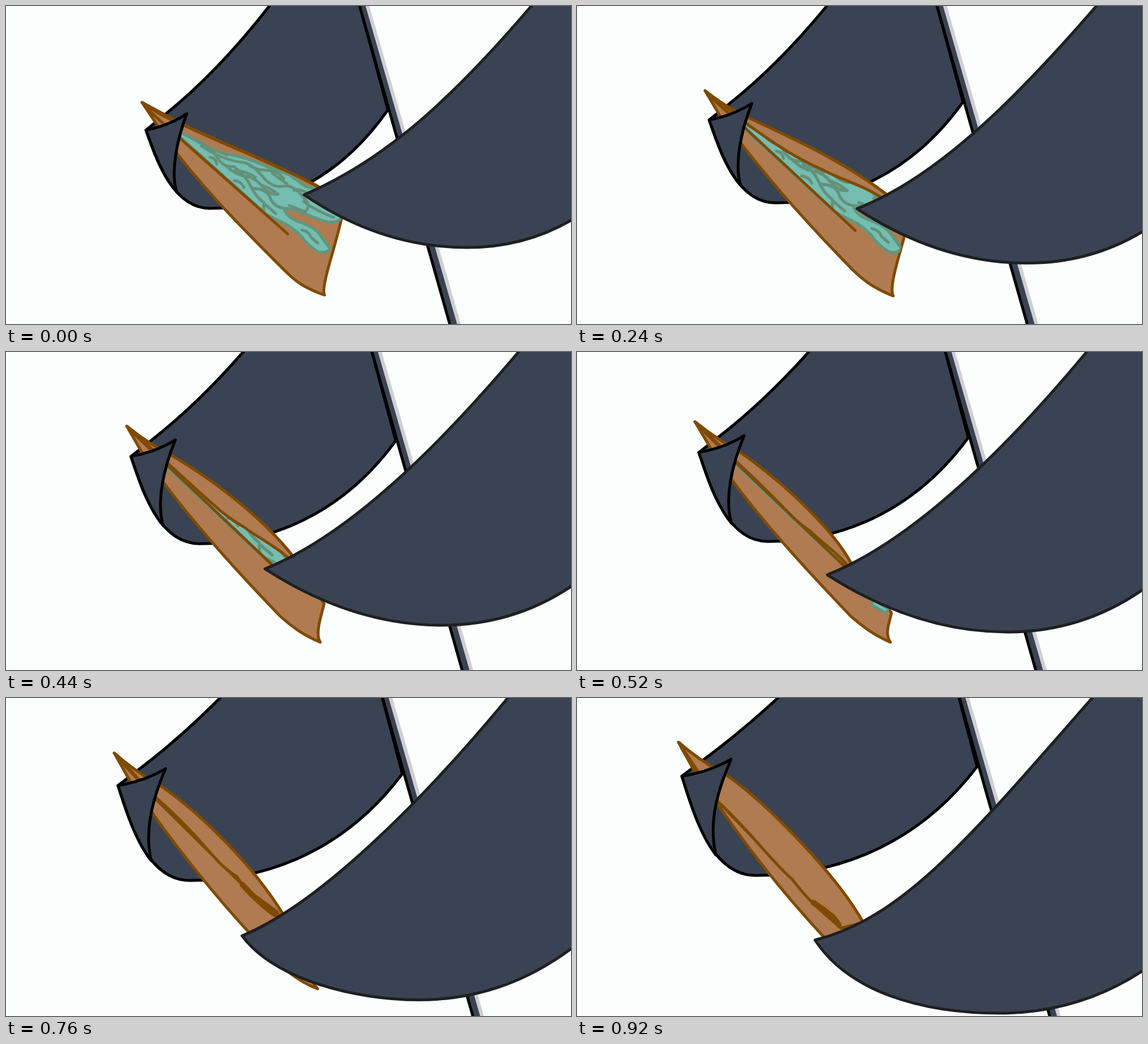
Animation, 997 px wide and 561 px high, one loop 0.96 s. Source, as an HTML page:

```html
<!DOCTYPE html>
<html lang="en">
<head>
<meta charset="utf-8">
<title>Rolling</title>
<style>
html, body { margin: 0; height: 100%; overflow: hidden; background: #fafffd; }
svg { display: block; width: 100%; height: 100%; }
path { stroke-width: 5; stroke-linejoin: round; stroke-linecap: round; fill: none; }
.skin { fill: #3a4353; stroke: #000; }
.front { stroke: #1f1f21; }
.rod { fill: #3a4353; }
.rim { stroke: #cfcfd2; stroke-width: 7; }
.line { stroke: #000; }
.paper { fill: #b07b50; stroke: #7f4a00; }
.crease { stroke: #7f4a00; }
.seam { stroke-width: 10; }
.herb { fill: #74bdb0; stroke: #5f9780; }
.strand { stroke: #64917a; }
</style>
</head>
<body>
<svg viewBox="0 0 997 561" preserveAspectRatio="none">
  <clipPath id="paperClip"><path id="clip"/></clipPath>
  <path id="body" class="skin"/>
  <g id="stick">
    <path class="rim" d="M631.5 -21L805 582"/>
    <path class="rod" d="M618 -21L628.5 -21L802 582L789 582Z"/>
    <path class="line" d="M618 -21L789 582"/>
  </g>
  <path id="paper" class="paper"/>
  <g clip-path="url(#paperClip)">
    <g id="filling">
      <path class="herb" d="M306 222L345 243Q375 260 395 262Q425 268 450 279Q478 290 500 298L528 318L552 324L592 374Q580 386 560 379Q530 368 505 358L490 357Q495 372 515 380Q545 390 555 405L572 428Q565 438 550 433Q530 420 522 407Q505 390 490 383L460 368L306 230Z"/>
      <path class="strand" d="M330 234Q360 246 372 266T402 283Q424 300 432 318T455 347V362M380 259L390 263M360 267Q370 268 372 279M345 247Q368 262 385 268T418 276T452 300T490 318T532 347Q536 354 528 363L500 352M405 290Q425 292 440 302M403 308Q415 309 420 320M430 282Q445 290 462 290T490 305M470 295L496 314M388 282Q405 298 422 300T452 318T480 332M436 322Q460 322 466 338T490 357M450 316Q465 320 478 331M458 351L476 366M508 325Q520 320 545 338M525 345Q545 360 578 373M522 395Q535 398 538 408L550 418"/>
    </g>
  </g>
  <path id="crumb" class="herb" d="M522 436L548 452Q550 462 540 458L520 446Z"/>
  <path id="crease" class="crease"/>
  <path id="flap" class="paper"/>
  <path id="seam" class="crease seam"/>
  <path id="thumb" class="skin"/>
  <path id="front" class="skin front"/>
</svg>
<script>
const LOOP = 960, STEP = 40, LAST = LOOP - STEP;
const el = id => document.getElementById(id);

// Path poses keyed by time in ms; poses of one shape share their commands.
const shapes = {
  body: {
    0: 'M480 -20Q382 110 280 192L247 219C265 270 294 357 360 357C480 357 591 302 674 183L619 -20Z',
    920: 'M378 -22Q300 52 227 106L185 138C205 200 235 313 315 313C440 313 591 272 706 121L669 -20Z'
  },
  thumb: {
    0: 'M247 219Q290 210 319 190C300 240 290 300 302 329C275 299 259 252 247 219Z',
    920: 'M185 138Q235 130 272 108C247 165 232 220 245 277C215 238 198 178 185 138Z'
  },
  paper: {
    0: 'M240 170Q275 195 320 213C420 258 520 298 580 335L592 375C580 430 555 495 562 510C525 497 510 485 490 465C430 405 360 335 304 263L268 212Z',
    160: 'M231 156Q265 182 305 203C390 240 480 275 553 325L584 394C575 430 551 495 559 511C525 497 508 485 488 465C420 395 350 320 296 250L258 198Z',
    320: 'M221 143Q255 172 297 190C400 240 460 275 540 340L571 420C566 440 548 497 557 512C525 500 505 485 485 466C410 390 345 315 287 240L245 187Z',
    520: 'M208 123Q245 153 288 177C350 220 448 305 485 375L555 460C552 475 542 497 553 512C525 500 505 485 483 466C420 400 340 315 275 228L236 170Z',
    680: 'M197 106Q236 139 280 163C335 203 430 290 488 380L541 486C540 495 538 500 550 513C520 502 500 485 480 468C415 400 340 315 264 211L225 155Z',
    840: 'M185 88Q224 124 270 150C330 190 425 275 490 383L541 486C540 495 538 500 550 513C520 502 500 485 480 468C412 400 330 305 254 197L212 137Z',
    920: 'M179 78Q218 112 265 137C340 190 460 315 505 396L541 486C540 495 538 500 550 513C520 502 500 485 480 468C408 395 325 300 248 187L207 129Z'
  },
  flap: {
    0: 'M240 170Q275 195 320 213C420 258 520 298 580 335L578 334C520 300 480 285 430 262C390 245 350 228 320 213Z',
    160: 'M231 156Q265 182 305 203C390 240 480 275 553 325L545 331C500 303 470 297 430 277C390 260 350 238 300 208Z',
    320: 'M221 143Q255 172 297 190C400 240 460 275 540 340L532 346C500 325 470 320 435 300C390 280 360 258 296 205Z',
    520: 'M208 123Q245 153 288 177C350 220 448 305 485 375L478 377C455 350 430 335 412 316C375 292 370 275 283 195Z',
    680: 'M197 106Q236 139 280 163C335 203 430 290 488 380L476 380C450 365 430 340 410 315C370 290 360 260 272 182Z',
    840: 'M185 88Q224 124 270 150C330 190 425 275 490 383L472 388C440 365 420 345 405 315C360 290 350 250 260 172Z',
    920: 'M179 78Q218 112 265 137C340 190 460 315 505 396L466 406C430 375 410 360 380 320C340 285 310 240 250 184Z'
  },
  crease: {
    0: 'M246 178Q285 215 310 236L497 402',
    320: 'M226 149Q262 182 293 209L489 394',
    680: 'M202 113Q240 152 268 182L472 378',
    840: 'M190 96Q230 140 258 172L468 386',
    920: 'M184 88Q220 145 250 184L464 405'
  },
  seam: {
    600: 'M408 312L425 337L448 356L480 378',
    840: 'M422 338L440 354L458 366L476 380',
    920: 'M417 361L436 374L452 387L462 400'
  },
  front: {
    0: pose(526, 333, 650, 280, 765, 190, 927, 378, 813, 426, 713, 617, 395),
    160: pose(508, 348, 640, 300, 765, 180, 921, 393, 803, 443, 701, 603, 411),
    320: pose(480, 367, 620, 310, 765, 170, 912, 404, 785, 464, 682, 580, 432),
    680: pose(411, 414, 580, 347, 760, 160, 889, 433, 738, 518, 630, 520, 483),
    840: pose(422, 425, 520, 383, 700, 215, 882, 452, 720, 547, 600, 428, 510),
    920: pose(420, 427, 575, 388, 690, 250, 909, 482, 745, 556, 610, 480, 519)
  }
};

// Front hand: fingertip, upper edge up to the top, lower edge through its lowest point.
function pose(x, y, ax, ay, bx, by, top, right, lowX, lowY, cx, dx, dy) {
  const bend = lowX + (997 - lowX) * 0.55;
  return `M${x} ${y}C${ax} ${ay} ${bx} ${by} ${top} 0L${top + 17} -20L1012 -20L1012 ${right - 9}` +
    `L997 ${right}Q${bend} ${lowY} ${lowX} ${lowY}C${cx} ${lowY} ${dx} ${dy} ${x} ${y}Z`;
}

function morph(poses, t) {
  const times = Object.keys(poses).map(Number);
  const next = Math.max(1, times.findIndex(k => k >= t));
  const from = times[next - 1], to = times[next];
  const k = Math.max(0, (t - from) / (to - from));
  const target = poses[to].match(/-?[\d.]+/g);
  let i = 0;
  return poses[from].replace(/-?[\d.]+/g, n => (+n + (target[i++] - n) * k).toFixed(2));
}

function draw(t) {
  const u = t / LAST, eased = u * (0.8 + 0.2 * u);
  for (const id in shapes) {
    const time = id === 'body' || id === 'thumb' ? eased * LAST : t;
    el(id).setAttribute('d', morph(shapes[id], time));
  }
  el('clip').setAttribute('d', el('paper').getAttribute('d'));
  el('stick').setAttribute('transform', `translate(${51 * eased} 0)`);
  el('filling').setAttribute('transform',
    `translate(562 430) scale(${1 + t * 1.7e-4} ${1 + t * 2.8e-4}) translate(-562 -430)`);
  el('crumb').style.visibility = t >= 480 && t < 640 ? 'visible' : 'hidden';
  el('seam').style.visibility = t >= 600 ? 'visible' : 'hidden';
}

function tick() {
  draw(Math.floor(performance.now() % LOOP / STEP) * STEP);
  requestAnimationFrame(tick);
}
tick();
</script>
</body>
</html>
```
